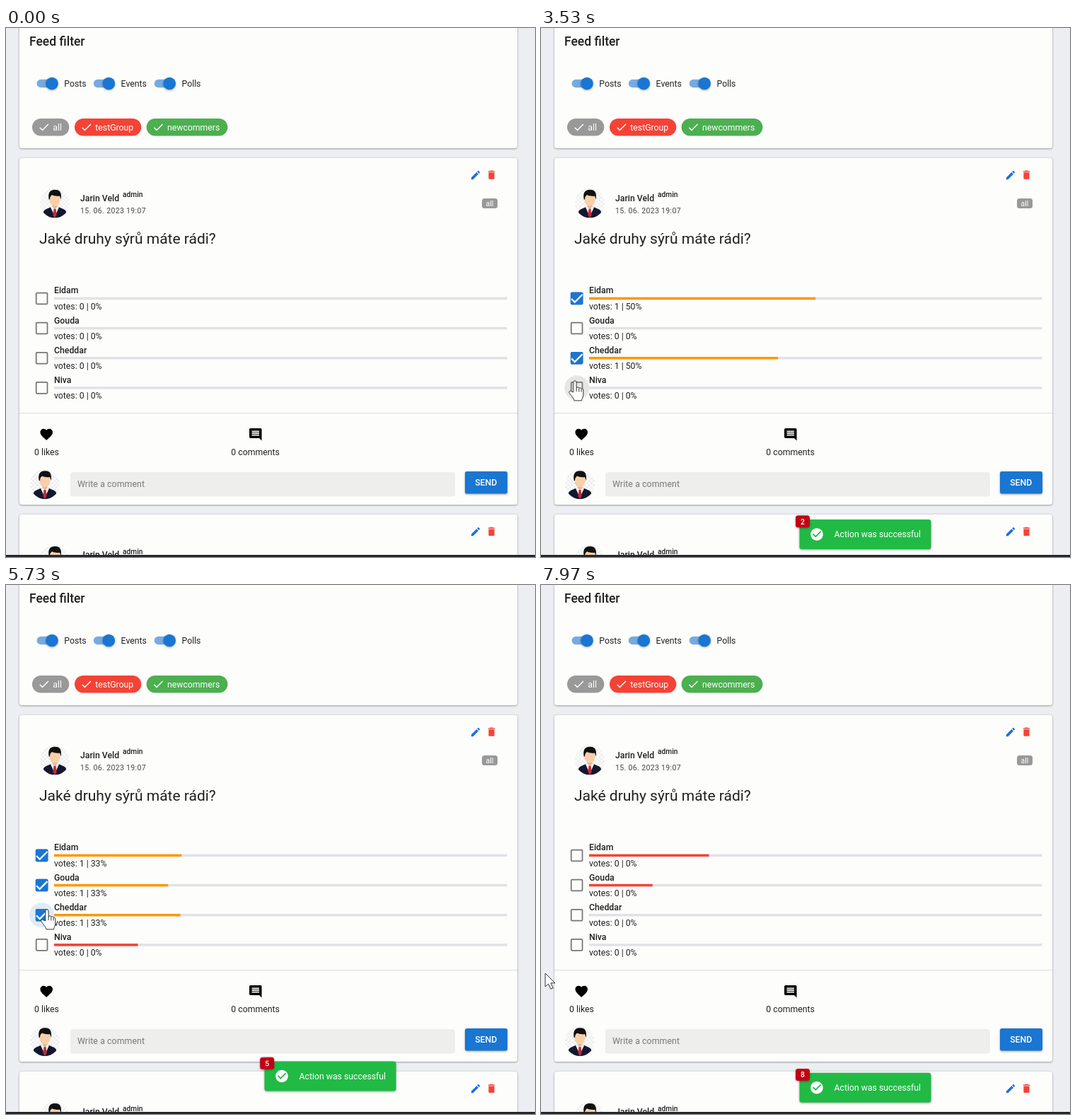
Write an HTML page that moves like this. It is 748 px wide and 748 px high and loops after 8 s.

```html
<!DOCTYPE html>
<html lang="en">
<head>
<meta charset="utf-8">
<title>Poll voting</title>
<style>
  html, body { margin: 0; width: 100%; height: 100%; overflow: hidden; background: #eceef1; }
  svg { display: block; }
  #stage { width: 100vw; height: 100vh; }
  text { font: 12.28px Roboto, Arial, sans-serif; fill: #202020; white-space: pre; }
  .medium { font-weight: 500; }
  .white { fill: #fff; }
  .small { font-size: 10.5px; }
  .mid { text-anchor: middle; }
  .card { fill: #fdfdfc; filter: drop-shadow(0 1px 1px rgba(0,0,0,.28)) drop-shadow(0 0 1.5px rgba(0,0,0,.14)); }
  .lift { filter: drop-shadow(0 1px 1.5px rgba(0,0,0,.35)); }
</style>
</head>
<body>
<svg id="stage" viewBox="0 0 748 748"></svg>
<script>
const LOOP = 8000, BAR_MS = 2100, TOAST_MS = 1000, BADGE_MS = 420;
const BAR_X = 68, BAR_W = 640.5, ROW_Y = 382.4, ROW_STEP = 42.15;
const BLUE = '#1976d2', RED = '#f44336', ORANGE = '#ff9800', GREEN = '#4caf50';
const OPTIONS = ['Eidam', 'Gouda', 'Cheddar', 'Niva'];

// [time, option toggled]
const VOTES = [[1795, 0], [2410, 2], [3676, 3], [4013, 1], [5388, 3], [5938, 2], [7105, 1], [7350, 0]];

// pointer path: [time, x, y]
const PATH = [
  [1000, -20, 440], [1500, 52, 377], [1830, 52, 377], [2060, 6, 415], [2330, 50, 462],
  [2450, 50, 462], [2800, -20, 480], [3150, -20, 490], [3440, 48, 499], [3690, 48, 499],
  [3930, 50, 420], [4050, 50, 420], [4400, -20, 430], [4900, -20, 505], [5050, 22, 508],
  [5300, 50, 504], [5420, 50, 504], [5650, 58, 459], [5950, 58, 459], [6300, 5, 430],
  [6560, 5, 430], [6690, 13, 430], [7030, 50, 421], [7130, 50, 421], [7280, 51, 379],
  [7390, 51, 379], [7700, 16, 470], [7940, 6, 549], [8000, 6, 549]
];

// wobble of the counter: [share of time, shift, degrees]
const WOBBLE = [[0, 0, 0], [.15, -.25, -5], [.3, .2, 3], [.45, -.15, -3], [.6, .1, 2], [.75, -.05, -1], [1, 0, 0]];

const ICONS = {
  edit: 'M3 17.25V21h3.75L17.81 9.94l-3.75-3.75L3 17.25zM20.71 7.04c.39-.39.39-1.02 0-1.41l-2.34-2.34c-.39-.39-1.02-.39-1.41 0l-1.83 1.83 3.75 3.75 1.83-1.83z',
  bin: 'M6 19c0 1.1.9 2 2 2h8c1.1 0 2-.9 2-2V7H6v12zM19 4h-3.5l-1-1h-5l-1 1H5v2h14V4z',
  heart: 'M12 21.35l-1.45-1.32C5.4 15.36 2 12.28 2 8.5 2 5.42 4.42 3 7.5 3c1.74 0 3.41.81 4.5 2.09C13.09 3.81 14.76 3 16.5 3 19.58 3 22 5.42 22 8.5c0 3.78-3.4 6.86-8.55 11.54z',
  comment: 'M22 4c0-1.1-.9-2-2-2H4c-1.1 0-2 .9-2 2v12c0 1.1.9 2 2 2h14l4 4zM18 14H6v-2h12v2zm0-3H6V9h12v2zm0-3H6V6h12v2z',
  check: 'M9 16.17L4.83 12l-1.42 1.41L9 19 21 7l-1.41-1.41z',
  done: 'M12 2C6.48 2 2 6.48 2 12s4.48 10 10 10 10-4.48 10-10S17.52 2 12 2zm-2 15l-5-5 1.41-1.41L10 14.17l7.59-7.59L19 8z'
};

const clamp = v => Math.max(0, Math.min(1, v));
const mix = (a, b, p) => a + (b - a) * p;

// CSS "ease": cubic-bezier(.25, .1, .25, 1)
function ease(x) {
  if (x <= 0) return 0;
  if (x >= 1) return 1;
  const curve = (a, b, s) => 3 * a * s * (1 - s) ** 2 + 3 * b * s * s * (1 - s) + s ** 3;
  let lo = 0, hi = 1;
  for (let i = 0; i < 24; i++) {
    const s = (lo + hi) / 2;
    if (curve(.25, .25, s) < x) lo = s; else hi = s;
  }
  return curve(.1, 1, lo);
}

// ---- markup helpers
const text = (x, y, str, cls = '', extra = '') => `<text x="${x}" y="${y}" class="${cls}" ${extra}>${str}</text>`;
const rect = (x, y, w, h, r, fill, extra = '') =>
  `<rect x="${x}" y="${y}" width="${w}" height="${h}" rx="${r}" fill="${fill}" ${extra}/>`;
const icon = (name, cx, cy, size, fill) =>
  `<path d="${ICONS[name]}" fill="${fill}" transform="translate(${cx - size / 2} ${cy - size / 2}) scale(${size / 24})"/>`;
const card = (y, h) => rect(19, y, 704, h, 3.5, '#fdfdfc', 'class="card"');
const avatar = (cx, cy) => `<use href="#avatar" x="${cx - 21}" y="${cy - 21}"/>`;

const toggle = (x, label) =>
  rect(x - 21.5, 72.7, 27, 11.6, 5.8, '#76abe1') +
  `<circle cx="${x}" cy="78.5" r="8.8" fill="${BLUE}" class="lift"/>` + text(x + 17.3, 82.8, label);

const chip = (x, w, label, fill) =>
  rect(x, 128, w, 24.5, 12.25, fill) + icon('check', x + 16.7, 140.3, 18, '#fff') + text(x + 29.3, 144.5, label, 'white');

const postHead = y => `<g transform="translate(0 ${y})">` +
  icon('edit', 664, 24, 16.4, '#1d6fe0') + icon('bin', 686.5, 23.7, 16.4, RED) + avatar(69, 63.5) +
  text(105, 60.6, 'Jarin Veld', 'medium') + text(165, 55.4, 'admin', 'medium', 'style="font-size:10.2px"') +
  text(105, 78, '15. 06. 2023 19:07', 'small', 'style="letter-spacing:.35px;fill:#444"') +
  rect(673, 57, 22, 14, 3.5, '#999') + text(684, 67.6, 'all', 'white small mid') + '</g>';

const optionRow = (label, i) => {
  const y = ROW_Y + i * ROW_STEP;
  return `<circle id="ring${i}" cx="50.6" cy="${y}" r="17.5"/>` +
    rect(42.7, y - 7.9, 15.8, 15.8, 1.2, 'none', 'stroke="#757575" stroke-width="1.75"') +
    `<g id="tick${i}">${rect(41.8, y - 8.8, 17.6, 17.6, 2, BLUE)}
      <path id="mark${i}" d="M1.73 12.91 8.1 19.28 22.79 4.59" fill="none" stroke="#fff" stroke-width="3.12"
        pathLength="1" stroke-dasharray="1 2" transform="translate(41.8 ${y - 8.8}) scale(.733)"/></g>` +
    text(68, y - 7, label, 'medium') + rect(BAR_X, y - 1.75, BAR_W, 3.5, 0, '#e1e2e6') +
    rect(BAR_X, y - 1.75, 0, 3.5, 0, RED, `id="bar${i}"`) +
    text(68, y + 15.2, '', '', `id="votes${i}"`);
};

const defs = `<defs>
  <pattern id="checks" width="6" height="6" patternUnits="userSpaceOnUse">
    <path d="M0 0h6v6h-6z" fill="#fdfdfd"/><path d="M0 0h3v3h-3zM3 3h3v3h-3z" fill="#eeeeef"/>
  </pattern>
  <clipPath id="round"><circle cx="21" cy="21" r="21"/></clipPath>
  <g id="avatar"><g clip-path="url(#round)">
    <path d="M0 0h42v42H0z" fill="url(#checks)"/>
    <path d="M4 42c0-8 1-11 5-12.500l8-3.500h8l8 3.500c4 1.500 5 4.500 5 12.500z" fill="#14182f"/>
    <path d="M15 27l6 13 6-13-3-2h-6z" fill="#f5f6fa"/>
    <path d="M19.500 29h3l1 9-2.500 4-2.500-4z" fill="#c62b36"/>
    <path d="M17.500 21h7v5l-3.500 3.500-3.500-3.500z" fill="#e9b48c"/>
    <ellipse cx="21" cy="16" rx="7.600" ry="9.500" fill="#f8cfa9"/>
    <path d="M12.700 16C11 7 14 2 21 2.300c7-.8 10.500 4.500 8.500 13.700l-1.500-5c-4 .6-8-.2-11-1.500-2 1.500-3 3-3 6.500z" fill="#101010"/>
  </g></g>
</defs>`;

const stage = document.getElementById('stage');
stage.innerHTML = defs + rect(0, 0, 748, 748, 0, '#eceef1') +
  card(-20, 190) + card(184, 490) + card(688, 90) +
  text(33, 24.7, 'Feed filter', 'medium', 'style="font-size:17.5px"') +
  toggle(65, 'Posts') + toggle(145.3, 'Events') + toggle(231.2, 'Polls') +
  chip(37, 52.3, 'all', '#999') + chip(97, 94.3, 'testGroup', RED) + chip(198.6, 114.8, 'newcommers', GREEN) +
  postHead(184) + postHead(688.2) +
  text(47, 305, 'Jaké druhy sýrů máte rádi?', '', 'style="font-size:21px"') +
  OPTIONS.map(optionRow).join('') +
  rect(19, 544.2, 704, 1, 0, '#d9dade') +
  icon('heart', 57.2, 574.7, 21, '#000') + text(57.5, 604, '0 likes', 'mid') +
  icon('comment', 352.8, 574.7, 21, '#000') + text(352.6, 604, '0 comments', 'mid') +
  avatar(55, 645) + rect(91, 628, 544, 34.5, 3.5, '#eeeeed') +
  text(101, 648.8, 'Write a comment', '', 'style="fill:#777;letter-spacing:.115px"') +
  rect(649, 627, 60, 31.5, 2.7, BLUE, 'class="lift"') +
  text(678.7, 646.5, 'SEND', 'white mid medium') +
  rect(0, 745, 748, 3, 0, '#24262a') +
  `<g id="toast">${rect(365.5, 0, 186, 42, 3.5, '#21ba45', 'class="lift"')}
    ${icon('done', 390, 21, 21, '#fff')}${text(414.5, 25.2, 'Action was successful', 'white')}
    <g id="badge">${rect(-10, -8.5, 20, 17, 3.5, '#c10015', 'class="lift"')}${text(0, 3.8, '', 'white small mid medium', 'id="count"')}</g>
  </g>
  <g id="pointer" stroke="#333" stroke-width="1" stroke-linejoin="round" fill="#fff">
    <path id="arrow" d="M0 0V19l4.500-4 3.300 7.300 3.300-1.500-3.200-7h6z"/>
    <g id="hand">
      <path d="M-2.300 16V2a2.200 2.200 0 0 1 4.400 0v8c.4-1.700 3.500-1.600 3.700.5 .6-1.300 3.100-1 3.300.9 .8-.9 2.700-.4 2.700 1.500v7c0 3-1.800 4-2.200 8H-1c-.5-3-3.500-6-6.700-10.500-1.600-2.600 1-4.300 2.900-2.400z"/>
      <path d="M2.100 10v5M5.800 10.500v5M9.100 11.500v4" fill="none"/>
    </g>
  </g>`;

const $ = id => document.getElementById(id);
const set = (id, attrs) => { for (const k in attrs) $(id).setAttribute(k, attrs[k]); };

function between(table, t) {
  const k = table.findIndex(row => row[0] > t);
  if (k < 0) return table[table.length - 1];
  if (k === 0) return table[0];
  const a = table[k - 1], b = table[k], p = (t - a[0]) / (b[0] - a[0]);
  return a.map((v, i) => mix(v, b[i], i ? p * p * (3 - 2 * p) : p));
}

// replays the votes up to time t; every changed bar restarts from where it is
function pollAt(t) {
  const rows = OPTIONS.map(() => ({ on: false, since: -1e6, from: 0, to: 0, start: -1e6 }));
  const fill = (r, now) => mix(r.from, r.to, ease((now - r.start) / BAR_MS));
  for (const [time, pick] of VOTES) {
    if (time > t) break;
    rows[pick].on = !rows[pick].on;
    rows[pick].since = time;
    const total = rows.filter(r => r.on).length;
    for (const r of rows) {
      const to = r.on ? 1 / total : 0;
      if (to !== r.to) Object.assign(r, { from: fill(r, time), to, start: time });
    }
  }
  return rows.map(r => ({ ...r, fill: fill(r, t) }));
}

function drawPoll(t, x, y) {
  let hovering = false;
  pollAt(t).forEach((r, i) => {
    const pct = Math.floor(r.to * 100 + 1e-6);
    const fade = clamp((t - r.since) / 220);
    const hover = Math.hypot(x - 50.6, y - ROW_Y - i * ROW_STEP) < 19;
    hovering = hovering || hover;
    set('bar' + i, { width: BAR_W * r.fill, fill: pct < 33 ? RED : pct < 100 ? ORANGE : GREEN });
    set('tick' + i, { opacity: r.on ? fade : 1 - fade });
    set('mark' + i, { 'stroke-dashoffset': r.on ? 1 - clamp((t - r.since - 60) / 180) : 0 });
    set('ring' + i, { fill: r.on ? BLUE : '#000', opacity: hover ? (r.on ? .13 : .09) : 0 });
    $('votes' + i).textContent = `votes: ${+r.on} | ${pct}%`;
  });
  return hovering;
}

function drawToast(t) {
  const count = VOTES.filter(v => v[0] <= t).length;
  const age = count ? t - VOTES[count - 1][0] : 0;
  const p = ease(age / TOAST_MS);
  const shift = (count === 1 ? 44 : -52.6) * (1 - p);
  set('toast', { transform: `translate(0 ${695 + shift})`, opacity: count === 0 ? 0 : count === 1 ? p : 1 });
  const [, dx, turn] = between(WOBBLE, age / BADGE_MS);
  set('badge', { transform: `translate(${370 + dx * 20} 2.7) rotate(${turn})`, opacity: count > 1 ? 1 : 0 });
  $('count').textContent = count;
}

function draw(t) {
  const [, x, y] = between(PATH, t);
  const hand = drawPoll(t, x, y);
  drawToast(t);
  set('pointer', { transform: `translate(${x} ${y})` });
  set('hand', { opacity: hand ? 1 : 0 });
  set('arrow', { opacity: hand ? 0 : 1 });
}

const began = performance.now();
function tick() {
  draw((performance.now() - began) % LOOP);
  requestAnimationFrame(tick);
}
tick();
</script>
</body>
</html>
```
